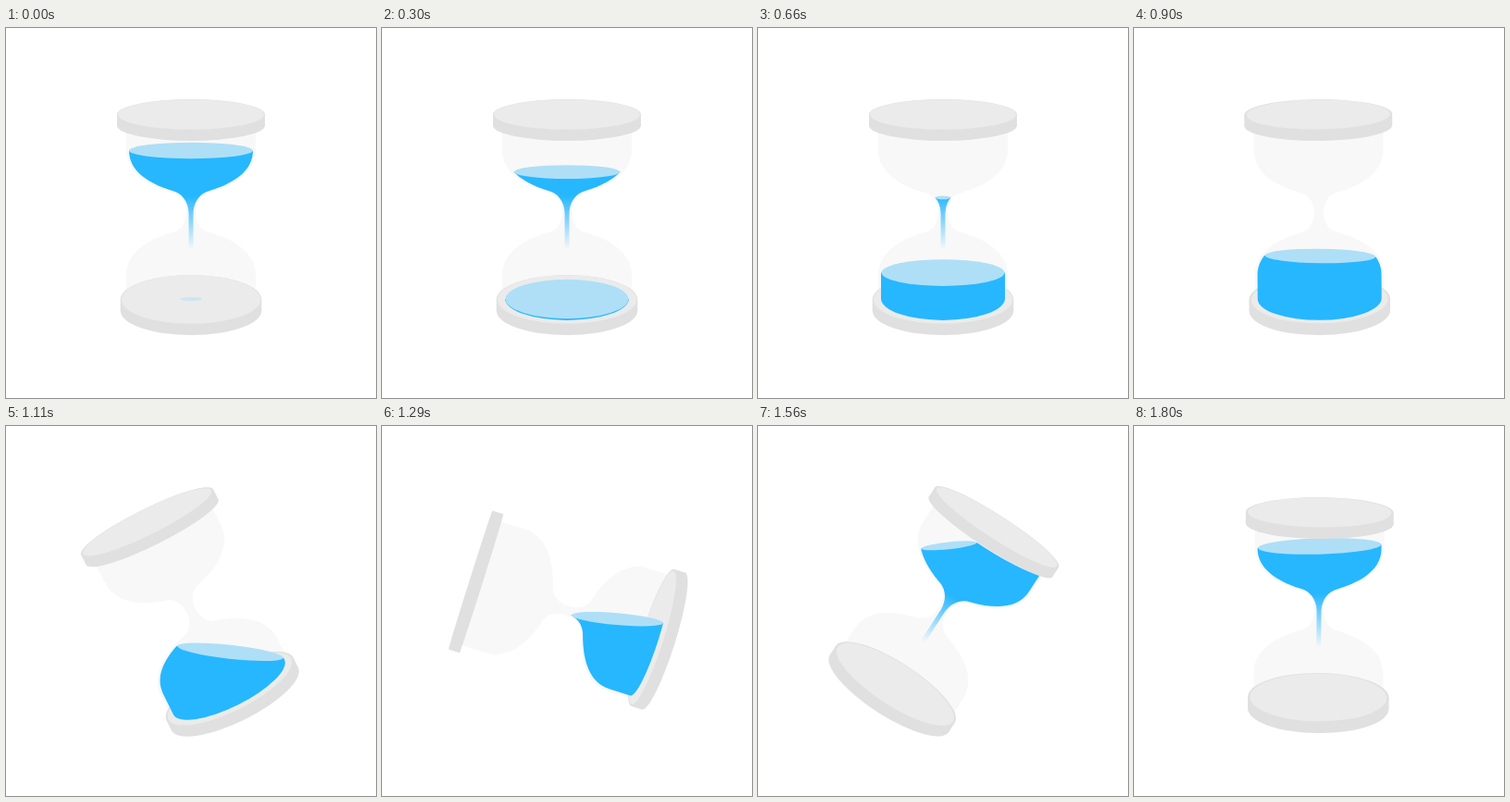
Animation of 400x400 px, one loop 1830 ms. Source, as an HTML page with a canvas:

```html
<!DOCTYPE html>
<html>
<head>
<meta charset="utf-8">
<style>
html, body { margin: 0; width: 100%; height: 100%; overflow: hidden; background: #fff; }
canvas { display: block; }
</style>
</head>
<body>
<canvas id="stage" width="400" height="400"></canvas>
<script>
const ctx = document.getElementById('stage').getContext('2d');
const LOOP = 1830, TURN = 870, CX = 200, CY = 199.5;
const BLUE = '#26b7ff', SURFACE = '#aedff7', GLASS = '#f8f8f8', SIDE = '#e0e0e0', FACE = '#ebebeb';
const clamp = v => Math.max(0, Math.min(1, v));
const smooth = v => v * v * (3 - 2 * v);

// Local frame: the axis of the hourglass is y, its neck is the origin.
function frame(angle) {
  ctx.setTransform(1, 0, 0, 1, CX, CY);
  ctx.rotate(-angle);
  ctx.scale(1, 1 + .035 * Math.sin(angle) ** 2);
}

// Signed flattening of a disc at either end (side = -1 or 1), seen from slightly above.
const tilt = (angle, side) => .277 * Math.cos(angle) + .072 * side;

function ellipse(x, y, rx, ry, color, turn = 0) {
  ctx.fillStyle = color;
  ctx.beginPath();
  ctx.ellipse(x, y, rx, ry, turn, 0, 2 * Math.PI);
  ctx.fill();
}

function drawGlass(angle) {
  frame(angle);
  ctx.fillStyle = GLASS;
  for (const side of [-1, 1]) {
    ctx.beginPath();
    ctx.moveTo(-70, 94 * side);
    ctx.lineTo(-70, 68 * side);
    ctx.bezierCurveTo(-70, 44 * side, -48, 29 * side, -18, 21 * side);
    ctx.bezierCurveTo(-10, 18.5 * side, -5, 10 * side, -5, -.3 * side);
    ctx.lineTo(5, -.3 * side);
    ctx.bezierCurveTo(5, 10 * side, 10, 18.5 * side, 18, 21 * side);
    ctx.bezierCurveTo(48, 29 * side, 70, 44 * side, 70, 68 * side);
    ctx.lineTo(70, 94 * side);
    ctx.fill();
  }
}

function drawPlate(angle, side) {
  const k = tilt(angle, side), r = 78.1 - 1.85 * side * Math.cos(angle);
  const near = side > 0 ? 94 : -106, far = near + 12, flat = Math.abs(k);
  const inset = angle ? 2.3 : 1;
  frame(angle);
  ellipse(0, near, r, r * flat, SIDE);
  ellipse(0, far, r, r * flat, SIDE);
  ctx.fillRect(-r, near, 2 * r, 12);
  if (flat > .02) ellipse(0, k > 0 ? near : far, r - inset, (r - inset) * flat, FACE);
}

// Inside of one bulb, plus a stream leaving it through the neck.
function bulbPath(angle, stream) {
  const path = new Path2D(), k = tilt(angle, 1), end = 93 - 3 * Math.abs(Math.sin(angle));
  path.ellipse(0, end, 67, 67 * Math.abs(k), 0, 0, Math.PI, k < 0);
  path.lineTo(-67, 67);
  path.bezierCurveTo(-67, 46, -48, 32, -20, 23.5);
  path.bezierCurveTo(-10, 21, -3, 12, -2.5, 0);
  path.lineTo(-2.5, -stream);
  path.lineTo(2.5, -stream);
  path.lineTo(2.5, 0);
  path.bezierCurveTo(3, 12, 10, 21, 20, 23.5);
  path.bezierCurveTo(48, 32, 67, 46, 67, 67);
  path.closePath();
  return path;
}

// Water below the line through (CX, y) with the given slope.
function drawWater(angle, y, slope, ratio, stream) {
  const path = bulbPath(angle, stream), level = x => y + slope * (x - CX);
  ctx.save();
  ctx.resetTransform();
  ctx.beginPath();
  ctx.moveTo(0, level(0));
  ctx.lineTo(400, level(400));
  ctx.lineTo(400, 400);
  ctx.lineTo(0, 400);
  ctx.clip();
  frame(angle);
  const fade = ctx.createLinearGradient(0, 18, 0, -40);
  fade.addColorStop(0, BLUE);
  fade.addColorStop(1, BLUE + '00');
  ctx.fillStyle = fade;
  ctx.fill(path);
  let left = 400, right = 0;
  for (let x = 50; x <= 350; x += .5) {
    if (ctx.isPointInPath(path, x, level(x))) {
      left = Math.min(left, x);
      right = Math.max(right, x);
    }
  }
  ctx.restore();
  const half = (right - left) / 2, mid = (left + right) / 2;
  if (half > 3) {
    ctx.resetTransform();
    ellipse(mid, level(mid), half, Math.max(half * ratio, 1.5), SURFACE, Math.atan(slope));
  }
}

function drain(t) {
  const low = 293 - .079 * Math.max(0, t - 300);
  const r = 12 + .2 * t;
  if (r < 67) {
    ctx.resetTransform();
    ctx.globalAlpha = Math.min(1, .5 + t / 100);
    ellipse(CX, 293, r, r * .318 * (.45 + .55 * r / 67), SURFACE);
    ctx.globalAlpha = 1;
  } else {
    drawWater(0, low, 0, .148 + .0036 * (low - 245.5), 0);
  }
  const high = 132.5 + .077 * t + .25 * Math.max(0, t - 660);
  if (high < 240) drawWater(Math.PI, high, 0, high > 175 ? .24 : .13, 40);
}

function pour(t, angle) {
  const y = 246.5 - 116.5 * smooth(clamp((t - TURN) / 690) ** 1.8);
  const slope = .12 * Math.sin(2 * Math.PI * ((t - TURN) / (LOOP - TURN)) ** 1.2);
  drawWater(angle, y, slope, .13, 40 * clamp((t - 1440) / 120));
}

function draw(t) {
  const turn = clamp((t - TURN) / (LOOP - TURN));
  const angle = Math.PI * (1 - Math.cos(Math.PI * turn)) / 2;
  const inward = side => side * tilt(angle, side) > 0;
  ctx.resetTransform();
  ctx.fillStyle = '#fff';
  ctx.fillRect(0, 0, 400, 400);
  drawGlass(angle);
  for (const side of [-1, 1]) if (inward(side)) drawPlate(angle, side);
  if (t < TURN) drain(t); else pour(t, angle);
  for (const side of [-1, 1]) if (!inward(side)) drawPlate(angle, side);
}

const start = performance.now();
function tick() {
  const t = (performance.now() - start) % LOOP;
  draw(Math.floor(t / 30) * 30);
  requestAnimationFrame(tick);
}
tick();
</script>
</body>
</html>
```
